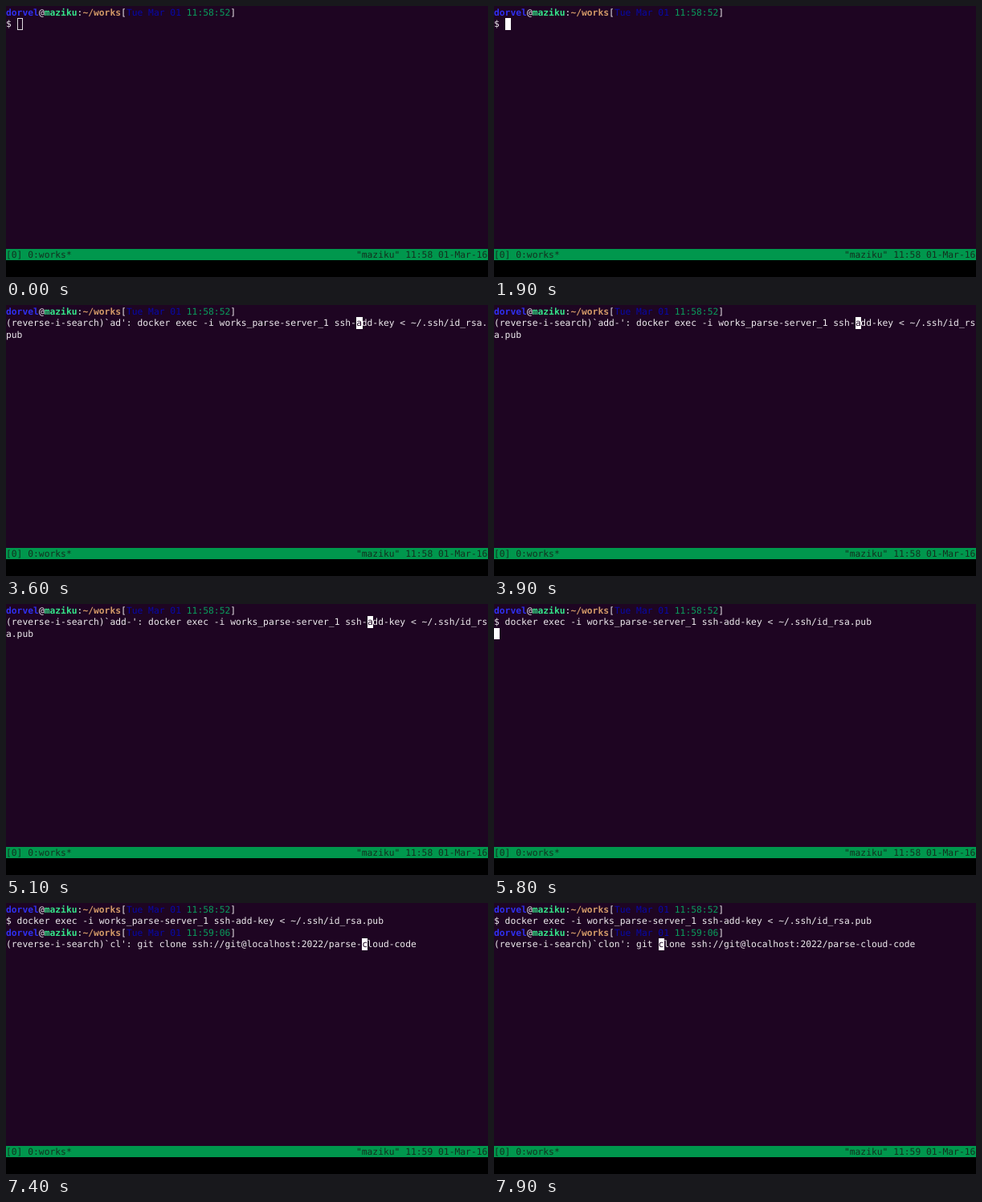
These frames come from a looping animation (600 by 338 pixels, 8 s). An HTML page:

```html
<!DOCTYPE html>
<html lang="en">
<head>
<meta charset="utf-8">
<title>Terminal</title>
<style>
html, body { margin: 0; width: 100%; height: 100%; overflow: hidden; background: #000; }
#term { position: absolute; left: 0; top: 0; width: 600px; height: 317.2px; background: #1e0522; overflow: hidden;
  color: #eeeaee; font: 11.325px/14.38px "DejaVu Sans Mono", monospace; text-rendering: geometricPrecision; }
.row { position: absolute; left: 0; width: 620px; height: 14.38px; white-space: pre; }
.bar { background: #00974d; color: #12301f; }
.user { color: #3030f0; font-weight: bold; }
.host { color: #35e58a; font-weight: bold; }
.path { color: #d29a68; font-weight: bold; }
.date { color: #0808a8; }
.time { color: #0a9c5c; }
#cursor { position: absolute; box-sizing: border-box; width: 7.2px; height: 14.6px; white-space: pre; color: #1e0522; background: #fff; }
#cursor.hollow { background: none; border: 1px solid #ddd8dd; }
</style>
</head>
<body>
<div id="term"></div>
<script>
const CELL = 600 / 88, LINE = 14.38, TOP = 1, COLS = 88, LOOP = 8000;
const USER = "dorvel", HOST = "maziku".replace(" ", "");
const ADD_KEY = "docker exec -i works_parse-server_1 ssh-add-key < ~/.ssh/id_rsa.pub";
const CLONE = "git clone ssh://git@localhost:2022/parse-cloud-code";

// [start, typed query, matching command]
const searches = [
  [2800, "", ""], [3400, "a", ADD_KEY], [3550, "ad", ADD_KEY], [3700, "add", ADD_KEY], [3850, "add-", ADD_KEY],
  [6800, "", ""], [7200, "c", ADD_KEY], [7400, "cl", CLONE], [7550, "clo", CLONE], [7700, "clon", CLONE]
];
const ENTER = 5600, DONE = 5900;
const hidden = [[1600, 1900], [2400, 2800], [4500, 5100], [6400, 6800]];

const term = document.getElementById("term");
const esc = s => s.replace(/&/g, "&amp;").replace(/</g, "&lt;");
const span = (cls, s) => `<span class="${cls}">${s}</span>`;
const row = (n, html, cls = "") =>
  `<div class="row ${cls}" style="top:${TOP + n * LINE}px">${html}</div>`;
const prompt = time => span("user", USER) + "@" + span("host", HOST) + ":" +
  span("path", "~/works") + "[" + span("date", "Tue Mar 01") + " " + span("time", time) + "]";

function cursor(pos, line, char, hollow) {
  const x = pos % COLS * CELL, y = TOP + (line + Math.floor(pos / COLS)) * LINE;
  return `<div id="cursor" class="${hollow ? "hollow" : ""}" style="left:${x}px;top:${y}px">${esc(char)}</div>`;
}

function screen(t) {
  const done = t >= DONE, line = done ? 3 : 1;
  let html = row(0, prompt("11:58:52")), text = "$ ", pos = 2, at = line;

  if (t >= ENTER) html += row(1, esc("$ " + ADD_KEY));
  if (done) html += row(2, prompt("11:59:06"));

  const search = searches.filter(s => s[0] <= t).pop();
  if (t >= ENTER && !done) {
    text = "";
    pos = 0;
    at = 2;
  } else if (search && (!done || search[0] > DONE)) {
    const [, query, match] = search;
    const lead = "(reverse-i-search)`" + query + "': ";
    text = lead + match;
    pos = lead.length + (query ? match.lastIndexOf(query) : 0);
  }

  for (let i = 0; i * COLS < text.length; i++)
    html += row(at + i, esc(text.substr(i * COLS, COLS)));
  if (!hidden.some(([a, b]) => t >= a && t < b))
    html += cursor(pos, at, text[pos] || " ", t < 1000);

  const status = "[0] 0:works*", clock = `"${HOST}" ${done ? "11:59" : "11:58"} 01-Mar-16`;
  return html + row(21, status + clock.padStart(COLS - status.length), "bar");
}

let shown;
function draw() {
  const html = screen(performance.now() % LOOP);
  if (html !== shown) term.innerHTML = shown = html;
  requestAnimationFrame(draw);
}
draw();
</script>
</body>
</html>
```
